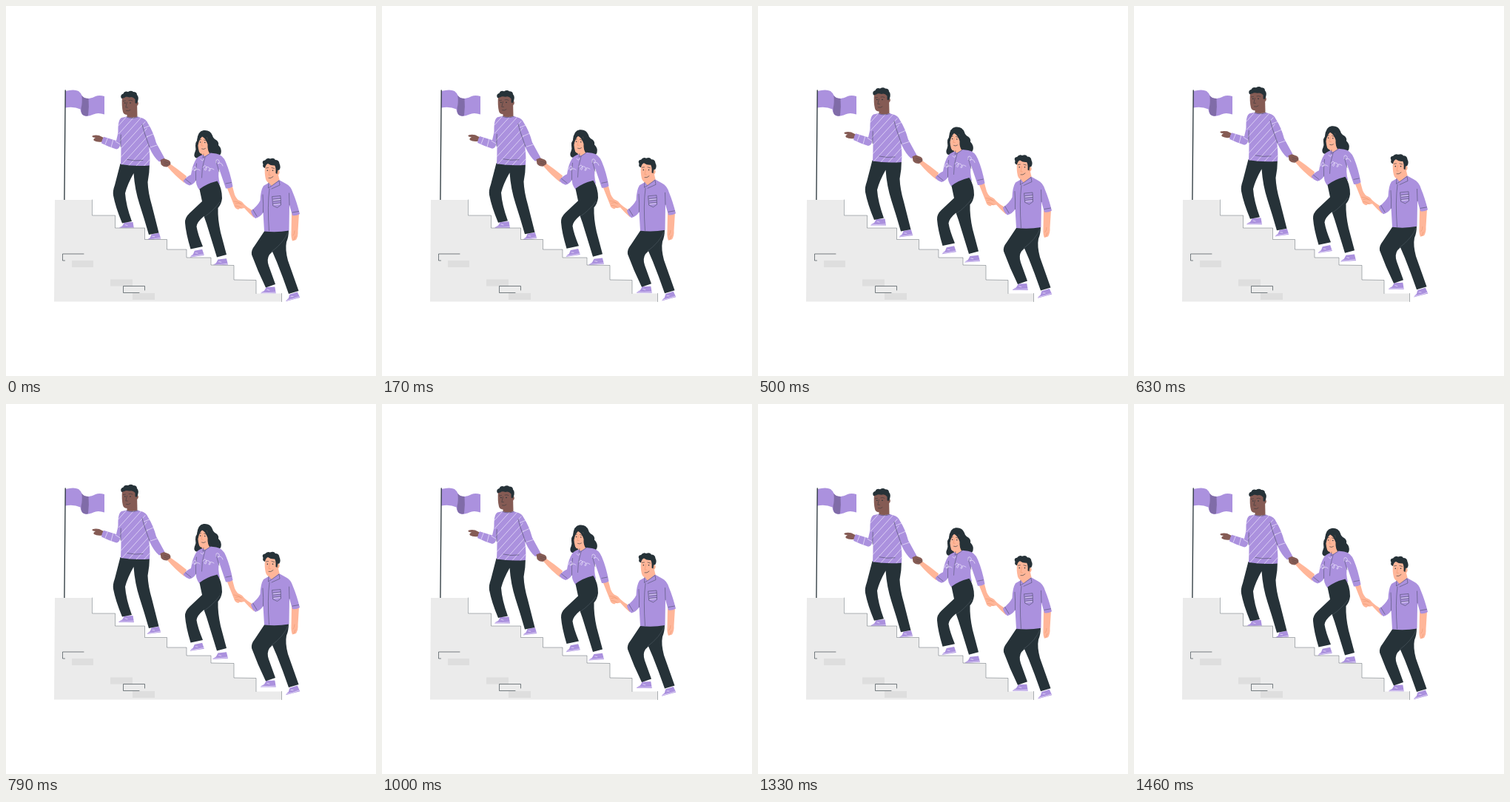
Animation, 500 px wide and 500 px high, one loop 1500 ms. Source, as an HTML page:

```html
<!DOCTYPE html>
<html lang="en">
<head>
<meta charset="utf-8">
<title>Climbing together</title>
<style>
html, body { margin: 0; width: 100%; height: 100%; overflow: hidden; background: #fff; }
svg { display: block; width: 100%; height: 100%; }
.purple { fill: #ab91de; }
.dark { fill: #263238; }
.light { fill: #ffb699; }
.brown { fill: #855b54; }
.line, .white, .fold, .crease { fill: none; stroke-linecap: round; stroke-linejoin: round; }
.line { stroke: #263238; stroke-width: .6; }
.white { stroke: #f5f0ff; stroke-width: .65; }
.fold { stroke: #ed986f; stroke-width: .6; }
.crease { stroke: #5d6870; stroke-width: .45; }
</style>
</head>
<body>
<svg viewBox="0 0 500 500">
  <defs>
    <path id="torso" d="M163 149.5Q170 152 178 149.5L185 152Q190 155 190.5 166L193.5 193Q195 206 194 215.5Q174 217 155 214Q155.500 203 155.500 192L151.500 170Q151 154 156 151Z"/>
    <path id="sleeve" d="M182 151Q189 152 192 159Q199 170 203 185L214.500 206Q212 209.500 207 210.500Q200 205 194 192L183.500 169Z"/>
    <path id="forearm" d="M155 153Q152 159 152 169L149 182L132 176.800Q129.500 180.500 129 185.500Q139 190.500 149 193.500Q154.500 193 155 183L159 165Z"/>
    <clipPath id="torsoClip"><use href="#torso"/></clipPath>
    <clipPath id="sleeveClip"><use href="#sleeve"/></clipPath>
    <clipPath id="forearmClip"><use href="#forearm"/></clipPath>
    <g id="shoe">
      <path class="purple" d="M8 0L19.500 -.5L21 8.500H0Q1 6.300 5 5Z"/>
      <path class="white" d="M1 7.300Q10 8 20.500 7M9 3.300L12 4.200"/>
    </g>
  </defs>

  <g id="flag">
    <path class="purple" d="M80 115Q92 112 98 115Q102 118 103 122Q106 125.500 112 125Q118 124 121 122Q126 120 133 122V146.500Q124 143.500 118 146.500Q110 150 105 148Q101 145.500 100.500 139.500Q92 135.500 80 137.500Z"/>
    <path d="M102.300 120.500Q105 125 111.500 125Q112.500 136 111 148.300Q106 149.500 103 146.500Q101 143 101.500 138Q103.500 131 102.300 120.500Z" fill="#806ca8"/>
    <path d="M80.200 114L78.900 262" stroke="#263238" stroke-width="1.300" stroke-linecap="round"/>
  </g>

  <g id="team">
    <!-- first climber -->
    <use href="#shoe" x="152" y="292.400"/>
    <use href="#shoe" transform="translate(189.500 309.500) rotate(-8) scale(.9)"/>
    <path class="dark" d="M154.500 213H194Q194 225 191.500 238Q192 252 197 269L206.500 306.500L193 309Q187 288 180.500 268Q174 248 172.500 226Q164 241 161 253Q162 269 170 291L157 293.500Q148 272 145 256Q144 250 147 242Z"/>
    <path class="brown" d="M163.500 140V150Q171 154 177.500 149.500L177 128Z"/>
    <path class="brown" d="M157 123Q156 135 158 143Q159 147 164 147Q170 147 174 142L177 135Q180.500 132 177.500 128.500L174 121Z"/>
    <path class="dark" d="M156 125Q153.500 120 158.500 118.500Q160 114.500 165 116Q169 113.500 172 116Q177 116 177 120Q180 123 178 129L176.500 132L174.500 131V126Q171 122 167 123.500Q162 122 160 124Z"/>
    <path class="line" d="M158.500 128.500L161.500 128M166 127.500Q169 126.500 171 128M163.500 130L161.800 137H164.500M162.500 141.500Q165.500 142.500 168 140.500" stroke-opacity=".8"/>
    <circle class="dark" cx="160.800" cy="131" r=".8"/><circle class="dark" cx="168" cy="131" r=".8"/>
    <path class="brown" d="M132 178L126 175Q121 174 117 175.200Q115.500 176.500 118 177.500L121 178Q117 180 119 182Q123 184.500 130 183.500Z"/>
    <use href="#forearm" class="purple"/>
    <use href="#torso" class="purple"/>
    <use href="#sleeve" class="purple"/>
    <g class="white" id="stripes" clip-path="url(#torsoClip)"></g>
    <path class="white" clip-path="url(#forearmClip)" d="M134 187L138 177M142 191L145 180M148 183L156 188"/>
    <path class="white" clip-path="url(#sleeveClip)" d="M186 165L196 161M190 177L201 172M195 191L207 187"/>
    <path class="line" d="M184 160L187 171L194 191M155.200 174L154.800 190M164 207.500Q174 210 185 208.500M163 150Q170 153 178 150" opacity=".75"/>

    <!-- second climber -->
    <use href="#shoe" transform="translate(247.500 332) rotate(-9) scale(.92)"/>
    <use href="#shoe" transform="translate(278.500 343) rotate(-4) scale(1 .95)"/>
    <path class="light" d="M220 212Q233 221 244 230L241 239Q229 230 218 217Z"/>
    <path class="brown" d="M208.500 208L213.500 206L220 208.500Q223.500 211 222 214.500L217.500 217.500Q212 217.500 209.500 214Z"/>
    <path d="M214 213L219 215M214 210.500L221 212.500" class="line" stroke-opacity=".4"/>
    <path class="light" d="M298 244H306L309 255Q312 262 316 263Q322 266 320.500 270L314 275Q309 274 308 269Z"/>
    <path class="dark" d="M258 182Q259 169 267 168Q276 167 279 175Q280 179 284 181Q288 184 287 188Q292 193 290.500 199Q288 205 282 204Q275 206 268 201Q263 207 256 205Q253 202 255.500 197Q257 194 256 189Q255.500 185 258 182Z"/>
    <path class="light" d="M264.500 192V200L267 206L276 199L273 184Z"/>
    <path class="light" d="M260 180Q258.500 189 261 197Q263 202 268 198Q273 194 273 187L272 178L265 174Z"/>
    <path class="dark" d="M258 184Q259 172 267 171.500Q274 178 275 190L280 200L276 200Q272 196 272.500 187Q270 179 265 176.500Q261 180 259.500 188Z"/>
    <path class="fold" d="M265.500 182L264 189H266.500"/>
    <path class="line" d="M261 181L263.500 180.500M267.500 181L270.500 182M264.500 193Q267 194.500 269.500 192.500"/>
    <circle class="dark" cx="262.700" cy="184" r=".75"/><circle class="dark" cx="268.800" cy="184.500" r=".75"/>
    <path class="purple" d="M266 201Q260 203 257.500 206Q252 214 250 228Q245 230 239.500 236Q242 240.500 248 242.500Q254 241 257 235Q256 241 261 248Q274 247 289 240.500Q286 230 288 220L297 246.500Q302 247 306.500 244Q303 225 297 211Q293 201 284 199.500L276 198.500L269 203Z"/>
    <path class="dark" d="M261.500 247.500Q271 240 285.500 236.500Q292 246 292 260Q291 268 286.500 273Q286 288 290 306L298 336L285 339.500L271 294L267.500 284Q258 292 257.500 298Q259 308 266 325L249.500 328.500Q243 307 242 293Q241.500 286 248 280L265 264Z"/>
    <path class="crease" d="M289 265Q280 277 268 285"/>
    <path class="line" d="M267 200L266 205L270 203L276 199M269 204Q264 219 264.500 232M284 210Q286 217 288 224M257.500 213Q256 225 256.500 236M297 240L304.500 238.500M242.500 234L250 240" opacity=".65"/>
    <path class="white" d="M252 222Q255 214 257 219Q257 224 254 222Q259 219 262 222M266 218Q270 213 271 219Q270 224 268 221Q271 215 275 219Q278 223 274 223Q275 217 281 221M284 212Q283 206 287 208Q290 211 286 213Q291 210 293 216M263 207Q266 211 267 207"/>

    <!-- third climber -->
    <use href="#shoe" x="343.800" y="380"/>
    <use href="#shoe" transform="translate(376 391.700) rotate(-15) scale(.95 .92)"/>
    <path class="dark" d="M350 303H382Q382 312 379 319Q377 329 381 344L395.500 385L382 389Q374 366 366 346L360 332L356 336Q352 342 355 351L364 376L351 380.500Q340 358 332 336Q331 330 336 324Z"/>
    <path class="crease" d="M381 306Q376 319 359 332"/>
    <path class="light" d="M335 277Q326 273 319 265Q313 262 309 264Q307 268 310 271Q315 275 322 273Q328 280 335 286Z"/>
    <path class="fold" d="M310 267Q314 265 319 268M310 270Q314 270 318 273M308 264Q314 264 317 267"/>
    <path class="light" d="M386 280H396L394.500 304Q395 311 392 316L387 317.500Q385 313 385.500 306Z"/>
    <path class="fold" d="M388 310Q390 308 390 304M389 316L391 311"/>
    <path class="light" d="M355 232L354.500 243L360 246L370 237L366.500 222Z"/>
    <path class="light" d="M350 216Q349 226 351 234Q353 240 358 239Q365 237 367 229Q371 226 369 222Q367 220 366 222V214L357 210Z"/>
    <path class="dark" d="M350 219Q346 218 347.500 214Q345 209 350 208.500Q353 204.500 357 206.500Q362 204.500 364 208Q369 208 369.500 213Q372 218 369 222Q367 220 366.500 227L364.500 226Q365 218 363 215.500Q358 216 354 213Q351 214 350 219Z"/>
    <path class="fold" d="M356.500 221L355 228.500H357.500M367.500 223Q369 224 367.500 227"/>
    <path class="line" d="M351.500 219L354.500 218.500M359 218.500L362.500 219.500M355 232.500Q358 233.500 361 230.500"/>
    <circle class="dark" cx="353.300" cy="222.300" r=".8"/><circle class="dark" cx="360.500" cy="222.300" r=".8"/>
    <path class="purple" d="M355 239L348 243Q344 249 343.500 263Q340 270 331 277Q332 283 337 287Q344 285 347.500 279L349 304.500Q366 306.500 382.500 303.500L383 269L387 283Q392 284 397 281Q393 265 388 253Q385 243 378 240L369 235L359 243Z"/>
    <path class="line" d="M355 239L354.500 246L359 243L369 236L370 242L359 247M356 247Q353 270 355.500 304M347 255Q348 268 347.500 279M382.500 253L383 269M387 279L395.500 277.500M333.500 275L339 284" opacity=".7"/>
    <path class="line" d="M360 257.500L371 256.500L371.500 269L366.500 272.500L361 270ZM361 261L371 260M361.500 264L371 263M361.500 267L371 266" opacity=".7"/>
    <path class="white" d="M361.500 262.500L370.500 261.500M362 268.500L370 267.500"/>
  </g>

  <g id="stairs">
    <path d="M66 262H116V283H147.500V300H187.500V315.500H217.500V329H244V340H277V350L308 350.500V370L338 370.500V388.500H372.500V399.500H65Z" fill="#ebebeb"/>
    <path class="line" d="M116.500 262V283H147.500V300H187.500V315.500H217.500V329H244V340H277V350L308 350.500V370L338 370.500V388.500M372.500 388.500V399.500" opacity=".6"/>
    <path d="M89 344h29v9h-29zM141 369.500h30v9h-30zM171 388h30v9h-30z" fill="#dedede"/>
    <path class="line" d="M105 335H76.500V344H79.500M187.500 384V378.500H158.500V387.500H180"/>
  </g>
</svg>
<script>
const LOOP = 1500, RISE = 6;
const team = document.getElementById('team');

// Parallel diagonals, trimmed to the sweater.
let d = '';
for (let x = 92; x < 200; x += 10.5) d += `M${x} 216L${x + 60} 150`;
document.getElementById('stripes').innerHTML = `<path d="${d}"/>`;

function draw(now) {
  const phase = (now % LOOP) / LOOP;
  const lift = RISE * (1 - Math.cos(phase * 2 * Math.PI)) / 2;
  team.setAttribute('transform', `translate(0 ${(-lift).toFixed(3)})`);
}

let start;
function tick(now) {
  start ??= now;
  draw(now - start);
  requestAnimationFrame(tick);
}
draw(0);
requestAnimationFrame(tick);
</script>
</body>
</html>
```
